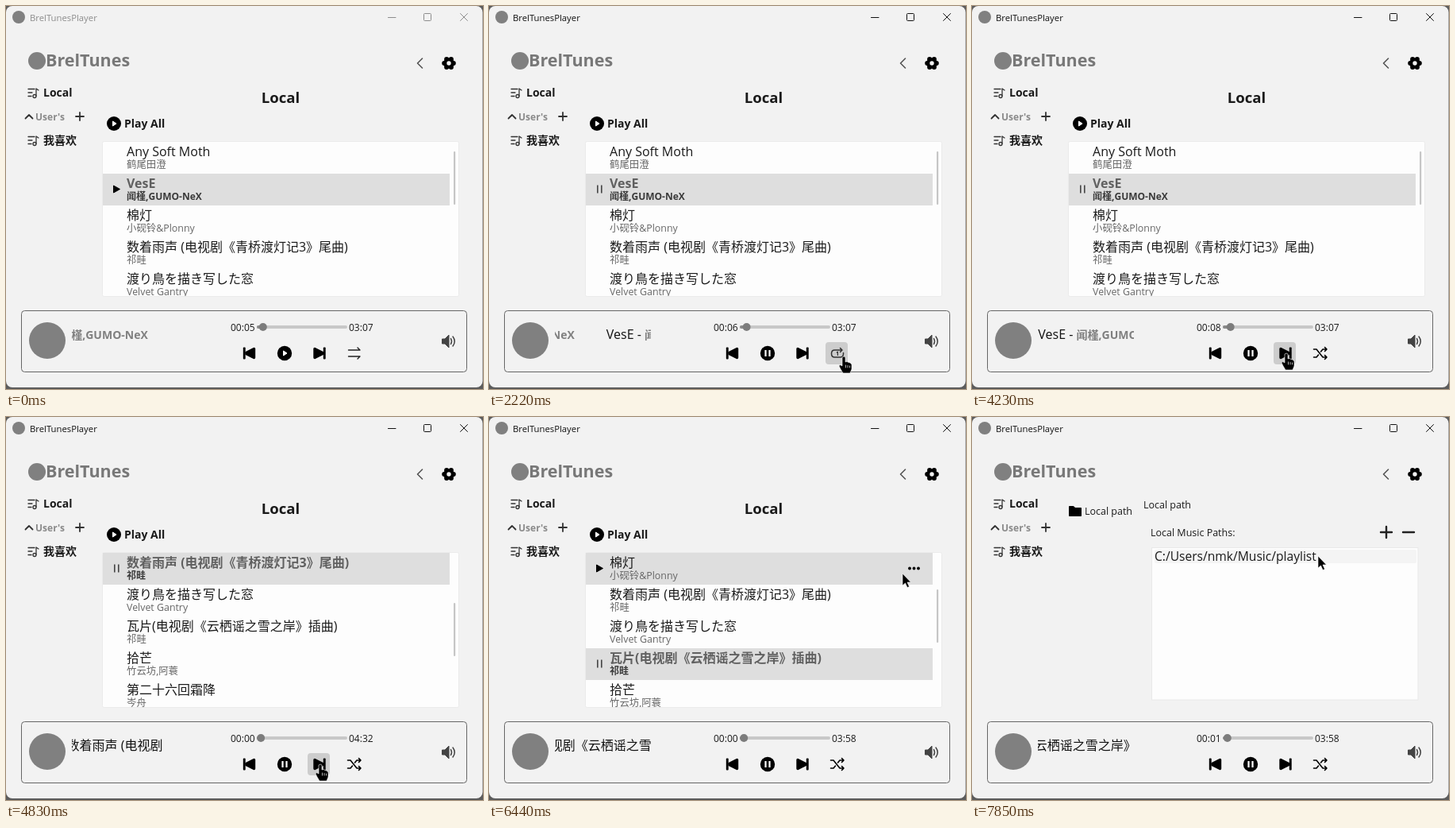
Recreate the animation shown at these times as an HTML page. Size 601 by 482 pixels, loop 8 s.

```html
<!DOCTYPE html>
<html lang="zh">
<head>
<meta charset="utf-8">
<style>
html, body { margin: 0; width: 100%; height: 100%; overflow: hidden; background: #555; }
svg { display: block; }
text { font-family: "Open Sans", "Noto Sans CJK SC", "Noto Sans CJK JP", sans-serif; white-space: pre; }
.line { fill: none; stroke-linecap: round; stroke-linejoin: round; }
</style>
</head>
<body>
<svg id="stage" width="601" height="482" viewBox="0 0 601 482"></svg>
<script>
const STEP = 201.25, STEPS = 40, LOOP = 8000;
const BG = '#f2f2f2';

const songs = [
  { title: 'Any Soft Moth', artist: '鹤尾田澄', length: 249 },
  { title: 'VesE', artist: '闻槿,GUMO-NeX', length: 187 },
  { title: '棉灯', artist: '小砚铃&amp;Plonny' },
  { title: '数着雨声 (电视剧《青桥渡灯记3》尾曲)', artist: '祁畦', length: 272 },
  { title: '渡り鳥を描き写した窓', artist: 'Velvet Gantry' },
  { title: '瓦片(电视剧《云栖谣之雪之岸》插曲)', artist: '祁畦', length: 238 },
  { title: '拾芒', artist: '竹云坊,阿蓑' },
  { title: '第二十六回霜降', artist: '岑舟' }
];

// step at which each song starts, with the list scroll that goes with it
const plays = [
  { at: 0, song: 1, scroll: 0 },
  { at: 22, song: 3, scroll: 120 },
  { at: 26, song: 0, scroll: 0 },
  { at: 30, song: 5, scroll: 80 }
];
const PLAY_AT = 4, REPEAT_AT = 9, SHUFFLE_AT = 12, SETTINGS_AT = 35;

// step, x, y
const pointerPath = [
  [1, 340, 442], [2, 351, 440], [6, 353, 440], [8, 445, 440], [11, 447, 441],
  [12, 440, 440], [14, 397, 438], [18, 396, 437], [24, 396, 437], [26, 400, 434],
  [29, 402, 432], [30, 402, 432], [32, 521, 197], [34, 558, 74], [35, 558, 76],
  [36, 545, 100], [39, 436, 175]
];

const text = (x, y, size, str, fill = '#1a1a1a', weight = 400, anchor = 'start') =>
  `<text x="${x}" y="${y}" font-size="${size}" fill="${fill}" font-weight="${weight}" text-anchor="${anchor}">${str}</text>`;
const rect = (x, y, w, h, fill, r = 0, stroke = 'none') =>
  `<rect x="${x}" y="${y}" width="${w}" height="${h}" rx="${r}" fill="${fill}" stroke="${stroke}"/>`;
const circle = (x, y, r, fill) => `<circle cx="${x}" cy="${y}" r="${r}" fill="${fill}"/>`;
const line = (d, color, width = 1) => `<path class="line" d="${d}" stroke="${color}" stroke-width="${width}"/>`;
const shape = (d, fill = '#000', edge = 1) =>
  `<path d="${d}" fill="${fill}" stroke="${fill}" stroke-width="${edge}" stroke-linejoin="round"/>`;
const clip = (x, y, w, h, body) => `<svg x="${x}" y="${y}" width="${w}" height="${h}">${body}</svg>`;
const at = (x, y, body) => `<g transform="translate(${x} ${y})">${body}</g>`;
const clock = s => [s / 60, s % 60].map(n => String(Math.floor(n)).padStart(2, '0')).join(':');

function pointerAt(step) {
  if (step < pointerPath[0][0]) return null;
  const next = pointerPath.findIndex(p => p[0] >= step);
  if (pointerPath[next][0] === step) return { x: pointerPath[next][1], y: pointerPath[next][2] };
  const [a, ax, ay] = pointerPath[next - 1], [b, bx, by] = pointerPath[next];
  const k = (step - a) / (b - a);
  return { x: ax + (bx - ax) * k, y: ay + (by - ay) * k };
}

const over = (p, x, y, w, h) => !!p && p.x >= x && p.x < x + w && p.y >= y && p.y < y + h;
const hoverBox = (p, x, y) => over(p, x, y, 28, 28) ? rect(x, y, 28, 28, '#cdcdcd', 4) : '';

const listIcon = y => at(27, y,
  line('M1 1.5H9M1 6H6M1 10.5H5M11 10V1L14 3', '#333', 1.3) +
  `<circle cx="9" cy="10.5" r="2" class="line" stroke="#333" stroke-width="1.3"/>`);

function gear() {
  let teeth = '';
  for (let i = 0; i < 6; i++) {
    const a = i * Math.PI / 3;
    teeth += circle(558 + 5.8 * Math.cos(a), 72 + 5.8 * Math.sin(a), 3, '#000');
  }
  return teeth + circle(558, 72, 6.8, '#000') + circle(558, 72, 2.7, BG);
}

function frame() {
  return rect(0, 0, 601, 482, '#5c5c5c') + rect(0, 0, 600.5, 480, BG, 8) +
    circle(16, 14, 8, '#808080') + circle(39, 69, 11, '#808080') +
    text(50, 76, 21.5, 'BrelTunes', '#787878', 700) +
    listIcon(103) + text(47, 114, 14, 'Local', '#1a1a1a', 700) +
    line('M24.5 141.5L29 137L33.5 141.5', '#333', 1.8) +
    text(37, 144, 12, 'User\'s', '#8a8a8a', 700) +
    line('M88 139H98M93 134V144', '#333', 1.8) +
    listIcon(163) + text(47, 174, 14, '我喜欢', '#1a1a1a', 700) +
    line('M524.5 66L518.5 72L524.5 78', '#555', 1.6) +
    rect(19.5, 383.5, 561, 77, BG, 4, '#666') +
    circle(52, 421, 23, '#808080') +
    shape('M549.5 419H553L558 414V430L553 425H549.5Z', '#444') +
    line('M560.5 418.5Q562.5 422 560.5 425.5M563 416Q567.5 422 563 428', '#444', 1.5);
}

function titleBar(active) {
  const ink = active ? '#111' : '#8c8c8c';
  return text(30, 18.5, 11.3, 'BrelTunesPlayer', ink) +
    line('M481.5 14.5H491', ink) + rect(526.5, 9.5, 9, 9, 'none', 1, ink) +
    line('M572.5 9.5L581.5 18.5M581.5 9.5L572.5 18.5', ink);
}

function songRow(song, y, state) {
  const { current, hovered, playing } = state;
  const weight = current ? 700 : 400;
  let out = current || hovered ? rect(0, y, 437, 40, '#dedede') : '';
  if (current && playing) out += rect(14, y + 14.5, 1.6, 10, '#444') + rect(19, y + 14.5, 1.6, 10, '#444');
  else if (current || hovered) out += shape(`M13.5 ${y + 15}L21.5 ${y + 19.5}L13.5 ${y + 24}Z`);
  if (hovered) out += [408, 413.5, 419].map(x => circle(x, y + 19.5, 1.9, '#000')).join('');
  return out + text(30, y + 18, 16, song.title, current ? '#606060' : '#1a1a1a', weight) +
    text(30, y + 33, current ? 12 : 12.4, song.artist, current ? '#3a3a3a' : '#666', weight);
}

function listPage(play, playing, pointer) {
  const inList = over(pointer, 122, 171, 437, 194);
  const rows = songs.map((song, i) => {
    const y = i * 40 - play.scroll;
    const hovered = inList && pointer.y - 171 >= y && pointer.y - 171 < y + 40;
    return songRow(song, y, { current: i === play.song, hovered, playing });
  }).join('');
  return text(346, 122, 18.6, 'Local', '#1a1a1a', 700, 'middle') +
    circle(136, 148, 9, '#000') + shape('M134.5 145L139 148L134.5 151Z', '#fff') +
    text(149, 153, 14, 'Play All', '#1a1a1a', 700) +
    rect(121.5, 170.5, 449, 195, '#fdfdfd', 2, '#ebebeb') +
    clip(122, 171, 449, 194, rows) +
    rect(564, 183 + play.scroll * 0.425, 2.2, 67, '#c6c6c6', 1);
}

function settingsPage(pointer) {
  return shape('M122.5 112.5H128L130 114.5H137.5V124.5H122.5Z') +
    text(142, 123, 12.5, 'Local path') + text(216, 115, 12.5, 'Local path') +
    text(225, 150, 12.5, 'Local Music Paths:') +
    line('M515 145H529M522 138V152M543 145H557', '#222', 2.4) +
    rect(226.5, 164.5, 335.5, 191.5, '#fdfdfd', 0, '#e9e9e9') +
    (over(pointer, 230, 167, 330, 18) ? rect(230, 167, 330, 17, '#f4f4f4', 2) : '') +
    text(230, 181, 15.6, 'C:/Users/nmk/Music/playlist');
}

function marquee(song, x) {
  const copy = gap => `<tspan dx="${gap}" font-size="16" fill="#111">${song.title} - </tspan>` +
    `<tspan font-size="14" font-weight="700" fill="#808080">${song.artist}</tspan>`;
  return clip(83, 395, 121, 40, `<text x="${x - 83}" y="24">${copy(0)}${copy(40)}</text>`);
}

function modeIcon(step) {
  if (step < REPEAT_AT)
    return line('M431.5 433H446M443 430L446 433M431.5 441H446M443 444L446 441', '#222', 1.4);
  if (step < SHUFFLE_AT)
    return line('M444.5 433H435.5Q431.5 433 431.5 437.5T435.5 442H442.5Q446.5 442 446.5 437.5V436.5' +
      'M442.5 430.5L445 433L442.5 435.5', '#333', 1.5) +
      line('M438.2 436L439.4 435.2V439.5', '#333', 1.2);
  return line('M430.5 432H434L442 442H447M430.5 442H434L436.5 439M439.5 435L442 432H447' +
    'M444.5 429.5L447 432L444.5 434.5M444.5 439.5L447 442L444.5 444.5', '#000', 1.6);
}

// skip mark pointing right, centred on the origin
const skipMark = rect(4.8, -7.5, 2.9, 15, '#000', 1) + shape('M-6 -5.5V5.5L3.5 0.8V-0.8Z', '#000', 3.4);

function player(step, play, playing, pointer) {
  const song = songs[play.song];
  const elapsed = play.at ? (step - play.at) * 0.2 : 5 + Math.max(0, step - PLAY_AT) * 0.2;
  const knob = 321 + elapsed / song.length * 105;
  const scroll = play.at ? 76.5 - 6.57 * (step - 24) : 20 - 6.45 * step;
  const mark = playing
    ? rect(347.4, 433, 2.2, 8, '#fff') + rect(352.4, 433, 2.2, 8, '#fff')
    : shape('M349.5 434L354 437L349.5 440Z', '#fff');
  return marquee(song, scroll) +
    text(283, 409, 12, clock(elapsed)) + text(432, 409, 12, clock(song.length)) +
    rect(316, 402, 114, 4, '#c8c8c8', 2) + rect(316, 402, knob - 316, 4, '#8a8a8a', 2) + circle(knob, 404, 5, '#7c7c7c') +
    [292, 337, 380, 424].map(x => hoverBox(pointer, x, 423)).join('') +
    at(306.5, 437, `<g transform="scale(-1 1)">${skipMark}</g>`) +
    circle(351, 437, 9.2, '#000') + mark +
    at(395, 437, skipMark) + modeIcon(step);
}

function cursor(p) {
  if (!p) return '';
  const hand = p.y > 400 || over(p, 544, 58, 28, 28);
  return at(p.x, p.y, hand
    ? `<path d="M-2 1Q0-1 2 1V7L4 6.5L6 7.5L8 8L10 10V16L8 21H-1L-4 16L-6 12Q-5 9.5-2 12Z" fill="#000" stroke="#fff" stroke-width=".6"/>` +
      line('M2.5 11V14M5 11.5V14M7.5 12V14', '#fff', .7)
    : `<path d="M0 0V15L3.5 12L6 17.5L8.5 16.5L6 11H10.5Z" fill="#000" stroke="#fff" stroke-width=".6"/>`);
}

function draw(step) {
  const pointer = pointerAt(step);
  const play = plays.filter(p => p.at <= step).pop();
  const playing = step >= PLAY_AT;
  return titleBar(playing) + hoverBox(pointer, 544, 58) + gear() +
    (step < SETTINGS_AT ? listPage(play, playing, pointer) : settingsPage(pointer)) +
    player(step, play, playing, pointer) + cursor(pointer);
}

const stage = document.getElementById('stage');
stage.innerHTML = frame() + '<g id="scene"></g>';
const scene = document.getElementById('scene');
const start = performance.now();
let shown = -1;

function tick() {
  const t = (performance.now() - start) % LOOP;
  const step = Math.min(STEPS - 1, Math.floor((t + 6) / STEP));
  if (step !== shown) scene.innerHTML = draw(shown = step);
  requestAnimationFrame(tick);
}
tick();
</script>
</body>
</html>
```
